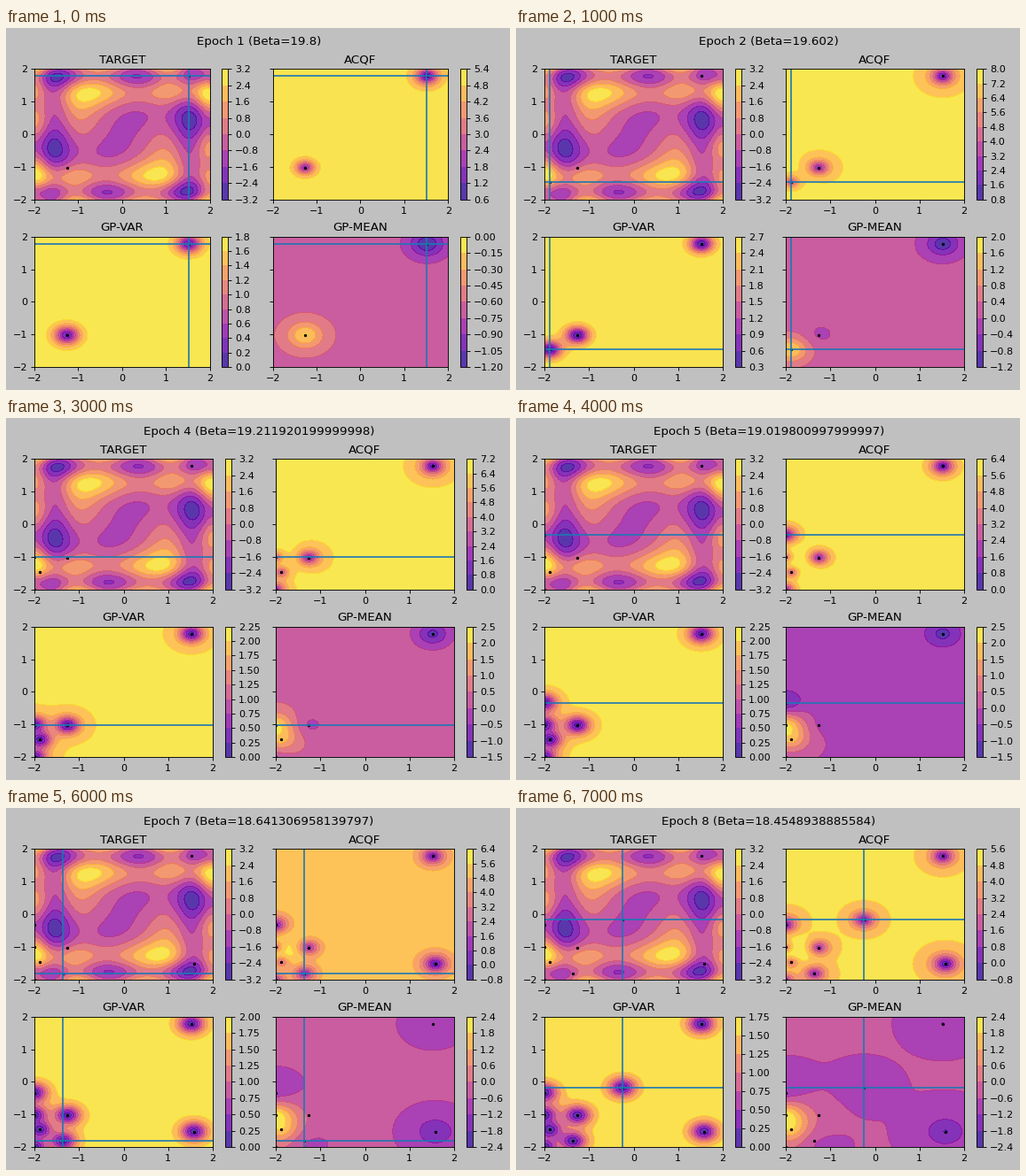
Write a matplotlib script that moves like this. It is 568 px wide and 409 px high and loops after 8 s.

```python
import numpy as np
import matplotlib.pyplot as plt
from matplotlib.animation import FuncAnimation

W, H, DPI = 568, 409, 80
EPOCHS = 8
LEFT, TOP, BOTTOM = 32, 46.3, 235.7
PANEL_H, GAP = 147.5, 71

# Sampled places: one to start with, then one per epoch.
POINTS = np.array([
    (-1.26, -1.02), (1.52, 1.78), (-1.88, -1.46), (-2, -2), (-2, -1.01),
    (-2, -0.33), (1.58, -1.52), (-1.36, -1.81), (-0.25, -0.17),
])

# Kernel settings drift between a few key epochs.
KEYS = (1, 2, 4, 6, 8)
SCALE = (1.75, 2.65, 2.03, 2.15, 1.69)
LENGTH = (0.33, 0.305, 0.31, 0.335, 0.355)
NOISE = (0.105, 0.14, 0.06, 0.055, 0.038)
PRIOR = (-0.66, 0.16, 0.36, -0.51, -0.588)

# Beta starts at 20 and decays by one percent per epoch.
BETAS = np.cumprod([20] + [0.99] * EPOCHS)

axis = np.linspace(-2, 2, 100)
GX, GY = np.meshgrid(axis, axis)
GRID = np.column_stack([GX.ravel(), GY.ravel()])


def target(x, y):
    return np.sin(2 * x**2) - np.cos(2 * y**2) - np.sin(2 * x * y)


def matern(a, b, length):
    dist = np.linalg.norm(a[:, None] - b[None], axis=2)
    r = np.sqrt(5) * dist / length
    return (1 + r + r**2 / 3) * np.exp(-r)


def posterior(pts, epoch):
    scale, length, noise, prior = (
        np.interp(epoch, KEYS, values)
        for values in (SCALE, LENGTH, NOISE, PRIOR))
    cov = matern(pts, pts, length) + noise * np.eye(len(pts))
    cross = matern(GRID, pts, length)
    weights = np.linalg.solve(cov, cross.T).T
    mean = prior + weights @ (target(*pts.T) - prior)
    var = scale * (1 - (weights * cross).sum(axis=1))
    return mean.reshape(GX.shape), var.reshape(GX.shape)


def add_axes(x, y, w, h):
    return fig.add_axes([x / W, 1 - (y + h) / H, w / W, h / H])


def draw_panel(title, z, pts, x, y, w, bands=7):
    ax = add_axes(x, y, w, PANEL_H)
    filled = ax.contourf(GX, GY, z, levels=bands, cmap="plasma", alpha=0.8)
    ax.plot(*pts.T, "k.", ms=4)
    ax.axvline(pts[-1, 0])
    ax.axhline(pts[-1, 1])
    ax.set(xlim=(-2, 2), ylim=(-2, 2), title=title,
           xticks=range(-2, 3), yticks=range(-2, 3))
    ax.tick_params(labelleft=x == LEFT)

    bar = add_axes(x + 1.068 * w, y, PANEL_H / 20, PANEL_H)
    fig.colorbar(filled, cax=bar, ticks=filled.levels)


def update(i):
    fig.clear()
    epoch = i + 1
    pts = POINTS[:epoch + 1]
    beta = BETAS[epoch]
    mean, var = posterior(pts, epoch)
    acqf = mean + np.sqrt(beta * var)

    # Long tick labels in the first epoch squeeze the panels a little.
    w = 197.6 if epoch == 1 else 201
    right = LEFT + w + GAP
    draw_panel("TARGET", target(GX, GY), pts, LEFT, TOP, w)
    draw_panel("ACQF", acqf, pts, right, TOP, w)
    draw_panel("GP-VAR", var, pts, LEFT, BOTTOM, w)
    draw_panel("GP-MEAN", mean, pts, right, BOTTOM, w, bands=6)
    fig.suptitle(f"Epoch {epoch} (Beta={beta})", fontsize=12,
                 x=284.7 / W, y=1 - 9 / H)
    return []


plt.rcParams.update({"font.family": "DejaVu Sans", "font.size": 10})
fig = plt.figure(figsize=(W / DPI, H / DPI), dpi=DPI, facecolor="silver")
anim = FuncAnimation(fig, update, frames=EPOCHS, init_func=lambda: [],
                     interval=1000, repeat=True)
plt.show()
```
